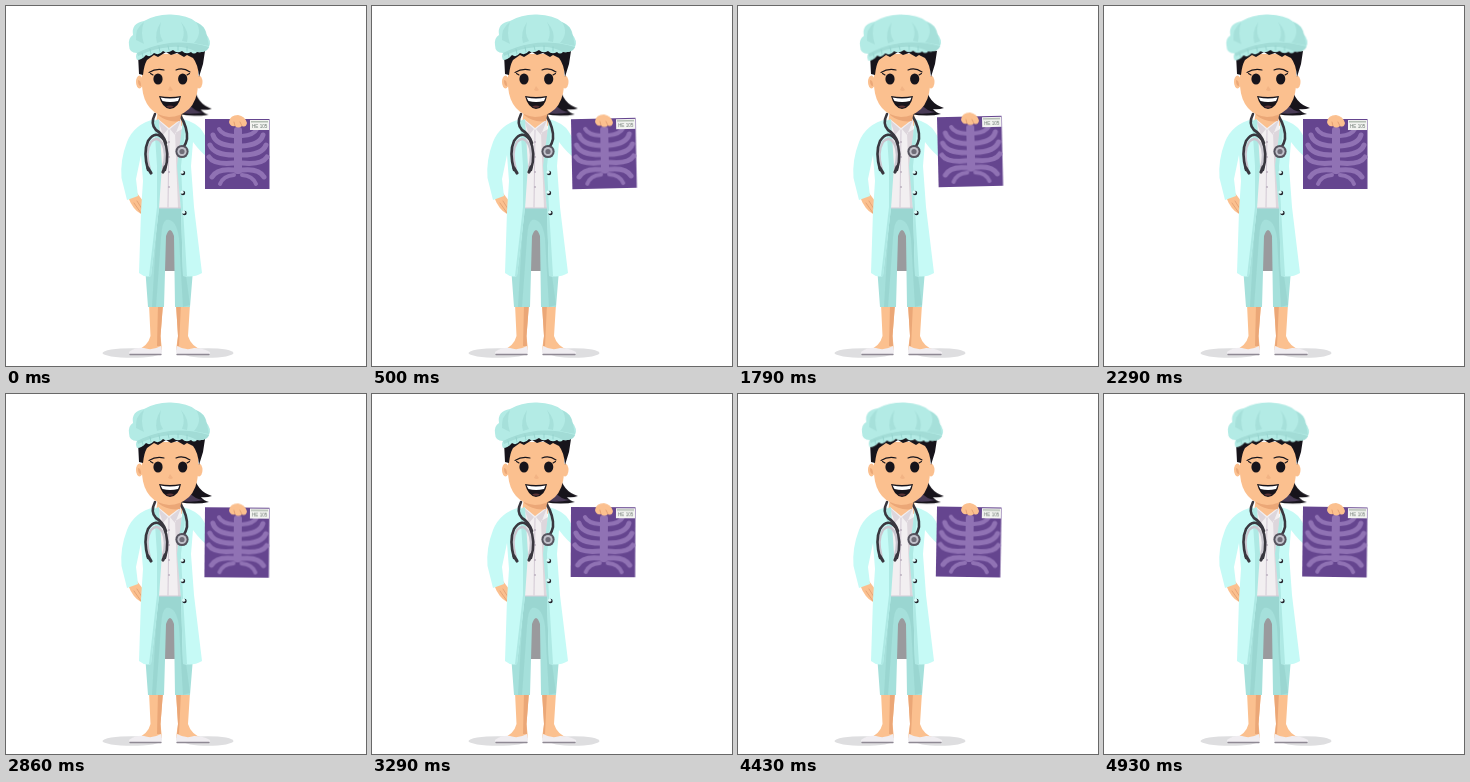
An HTML page for the animation above (5 s loop, 360x360 px).

```html
<!DOCTYPE html>
<html lang="en">
<head>
<meta charset="utf-8">
<title>Nurse with X-ray</title>
<style>
html, body { margin: 0; width: 100%; height: 100%; overflow: hidden; background: #fff; }
svg { display: block; width: 100vw; height: 100vh; }
.skin { fill: #fbc08f; }
.tan { fill: #eba777; }
.coat { fill: #c6faf6; }
.fold { fill: #aee9e4; }
.felt { fill: #b3ebe5; }
.felt-dark { fill: #a2dcd6; }
.hair { fill: #17141b; }
.line { fill: none; stroke-linecap: round; stroke-linejoin: round; }
.sheet { transform-origin: 232px 114px; animation: swing 5s ease-in-out infinite; }
.arm { animation: lift 5s ease-in-out infinite; }
.cap { transform-origin: 165px 80px; animation: sway 5s ease-in-out infinite; }
.tail { transform-origin: 182px 96px; animation: flick 5s ease-in-out infinite; }
@keyframes swing {
  0%, 3% { transform: none; }
  22.8% { transform: rotate(-4.4deg); }
  44% { transform: none; }
  57% { transform: rotate(.5deg); }
  76% { transform: none; }
  88% { transform: rotate(1deg); }
  98.6% { transform: rotate(.7deg); }
  100% { transform: none; }
}
@keyframes lift {
  0%, 3% { transform: none; }
  22.8% { transform: translateY(-2px); }
  35% { transform: translateY(-2.5px); }
  50% { transform: translateY(.5px); }
  76%, 100% { transform: none; }
}
@keyframes sway {
  0%, 14% { transform: none; }
  36% { transform: rotate(-1.3deg); }
  57%, 76% { transform: none; }
  88%, 98.6% { transform: rotate(1.4deg); }
  100% { transform: none; }
}
@keyframes flick {
  0% { transform: rotate(2deg); }
  21%, 57% { transform: none; }
  76%, 98.6% { transform: rotate(.5deg); }
  100% { transform: rotate(2deg); }
}
</style>
</head>
<body>
<svg viewBox="0 0 360 360">
  <defs>
    <g id="ribs" class="line" stroke="#9072b4" stroke-width="5">
      <path d="M213 123Q216 129 228 130" stroke-width="4"/>
      <path d="M207 129Q210 139 228 140"/>
      <path d="M204 139Q208 149 228 149"/>
      <path d="M203 151Q208 159 228 157"/>
      <path d="M206 171Q211 162 228 164"/>
      <path d="M214 178Q217 170 228 169" stroke-width="4"/>
    </g>
    <g id="button">
      <circle r="2.2" fill="#24232c"/>
      <circle cx="-.9" cy="-.8" r="1.6" fill="#dffffc"/>
    </g>
  </defs>

  <g fill="#dedee0">
    <ellipse cx="126" cy="347" rx="29.5" ry="4.8"/>
    <ellipse cx="202" cy="347" rx="25.5" ry="4.8"/>
  </g>

  <!-- legs -->
  <path class="skin" d="M143 298H157L154.5 330L156 344H131Q142 340 144.5 330ZM170 298H184L182 330Q185 340 196 344H170L172 330Z"/>
  <path class="tan" d="M152 298H157L154.5 330L155 340H151ZM170 298H175L173 340H171L172 330Z"/>
  <path fill="#f0edf1" d="M123 346Q130 341 138 342Q146 345 155 340Q157 345 155 349H126Q123 349 123 346ZM171 340Q180 345 188 342Q197 342 204 346Q205 349 200 349H171Q169 345 171 340Z"/>
  <path class="line" stroke="#8f8994" stroke-width="1.3" d="M124 348.5H155M171 348.5H203"/>
  <path fill="#9a9a9d" d="M158 215H172V265H158Z"/>
  <path fill="#a5e0db" d="M150 200H177L187 264L184 301H169L168 230Q164 218 160 230L158 301H142L139 260Z"/>
  <path fill="#8fcdc8" d="M152 203H175L179 262L184 299L177 301L173 232Q170 212 160 214Q156 216 155 232L150 301H146L149 250Z" opacity=".5"/>

  <!-- torso -->
  <path class="skin" d="M152 102H176L177 119L163 127L150 119Z"/>
  <path fill="#f2eff1" d="M152 113L163 122L175 113L178 202H152Z"/>
  <path fill="#ddd6dc" d="M152 114L162 123L157 129ZM175 114L164 123L169 129ZM169 127L178 122V202H172Z"/>
  <path class="line" stroke="#cfc5d1" stroke-width=".9" d="M163 124L162 201M153 202H175"/>
  <g fill="#b8acbb">
    <circle cx="163" cy="136" r=".9"/><circle cx="163" cy="151" r=".9"/>
    <circle cx="163" cy="166" r=".9"/><circle cx="163" cy="181" r=".9"/>
  </g>

  <path class="skin" d="M122 191L131 187L137 195Q139 204 135 208Q127 204 122 191Z"/>
  <path class="line" stroke="#e09d70" stroke-width=".8" d="M128 197L135 207M131 195L136 203"/>
  <path class="coat" d="M149 113Q128 118 121 136Q114 154 115.5 172L121 194L132 190L130 173L135 149L137 175L135 205L133 267Q139 272 145 270L153 202L154 160Z"/>
  <path class="coat" d="M177 113Q192 117 197 126L204 138V153Q195 147 187 136L185 160L188 201L196 267Q188 272 177 270L175 203L172 160Z"/>
  <path class="fold" d="M148 115L153 113L156 160L153 202L145 270L143 270L151 201L151 160ZM177 114L180 116L175 160L177 203L181 270L177 270L175 203L171 160Z"/>
  <use href="#button" x="177" y="167"/>
  <use href="#button" x="177" y="187"/>
  <use href="#button" x="178.5" y="207"/>

  <!-- stethoscope -->
  <g class="line" stroke="#39373f" stroke-width="2.6">
    <path d="M149 108Q144 118 150 124Q157 128 160 137"/>
    <path d="M174 109Q182 122 181 133Q180 138 177 142"/>
    <path stroke="#c9c6cf" stroke-width="2.4" d="M143.5 162Q139 146 145 136Q151 129 156.5 138Q161 147 157 162"/>
    <path d="M142 164Q137 146 142 135Q150 123 158 134Q164 147 159 164"/>
    <path stroke-width="3.2" d="M142 162L145 167M159 161L157 166"/>
  </g>
  <circle cx="176" cy="145.5" r="6.6" fill="#55535e"/>
  <circle cx="176" cy="145.5" r="4.6" fill="#c1c1ca"/>
  <circle cx="176" cy="145.5" r="2.6" fill="#6f6d78"/>

  <!-- head -->
  <g class="tail">
    <path class="hair" d="M188 80Q190 97 206 102Q200 104 195 103Q198 107 203 108Q190 111 172 108Q182 102 188 80Z"/>
    <path fill="#493b56" d="M183 98Q188 105 198 106Q186 109 175 107Z"/>
  </g>
  <path class="tan" d="M152 104Q163 115 176 104L174 115Q162 117 152 109Z"/>
  <g class="skin">
    <ellipse cx="133.5" cy="76" rx="3.5" ry="6.5"/>
    <ellipse cx="193" cy="76" rx="3.5" ry="6.5"/>
    <path d="M136 48H192V80Q191 95 183 103Q174 111 163 111Q151 110 144 102Q137 94 136 80Z"/>
  </g>
  <path class="tan" d="M132 74Q135 74 135 80Q132 80 132 74Z"/>
  <path class="hair" d="M132 48Q164 34 199 45L197 58L193 71Q192 58 187 52L181 49L178 51L171 47L165 49L160 46L152 51L148 49L141 54Q138 59 137 69L133 68Z"/>
  <path class="line" stroke="#17141b" stroke-width="1.1" d="M143 66.5Q150 62 158 64M170 64Q177 61 184 66M147 69L144.5 67.5M181 69L183.5 67.5"/>
  <g class="hair">
    <ellipse cx="152" cy="73" rx="4.6" ry="5.6"/>
    <ellipse cx="176.7" cy="73" rx="4.6" ry="5.6"/>
  </g>
  <path fill="#f2b384" d="M164 80L167 84Q165 86 162 84Z"/>
  <path class="hair" d="M153 90Q164 92 175 90Q173 102 164 103Q156 102 153 90Z"/>
  <path fill="#fff" d="M154.5 91.5Q164 93.5 173.5 91.5L172 95Q164 97 156.5 95Z"/>
  <path fill="#5c3436" d="M160 100.5Q164 98.5 168 100.5Q164 103 160 100.5Z"/>

  <g class="cap">
    <path class="felt" d="M131 54Q129 50 131 47Q123 47 123 39Q122 32 127 29Q125 17 138 15Q150 8 165 8.5Q182 9 190 16Q200 20 200 28Q206 35 203 41Q201 47 191 46Q188 49 185 46Q180 49 176 45Q171 48 167 44Q161 48 157 45Q153 50 148 47Q144 52 140 49Q136 54 131 54Z"/>
    <path class="felt-dark" d="M131 47Q145 40 158 38Q178 34 203 41Q201 47 191 46Q180 40 165 41Q148 42 132 50Z"/>
    <path class="felt-dark" d="M130 34Q129 22 138 16Q134 26 138 38ZM190 16Q200 21 201 30L203 40L188 37Q197 27 190 16ZM151 37Q148 26 155 16Q152 28 157 35ZM176 35Q180 26 175 16Q184 26 181 36Z" opacity=".7"/>
    <path class="line" stroke="#93d2cc" stroke-width=".9" d="M136 47L137 51M144 43L145 48M153 41L154 46M162 40L163 44M172 40L172 44M181 41L181 45"/>
  </g>

  <!-- X-ray -->
  <g class="arm">
    <g class="sheet">
      <rect x="199" y="113" width="64.5" height="70" fill="#65458f"/>
      <use href="#ribs"/>
      <use href="#ribs" transform="matrix(-1 0 0 1 464 0)"/>
      <rect x="228" y="121" width="8" height="47" rx="3" fill="#9072b4"/>
      <rect x="244" y="114" width="19" height="10" fill="#f3f4f1"/>
      <path fill="#b3bdb2" d="M245 115H262V116.5H245Z"/>
      <text x="246" y="122" font-family="Liberation Sans, Arial, sans-serif" font-size="4.6" fill="#66726c">HE 105</text>
    </g>
    <path class="skin" d="M223 116Q224 109 232 109Q239 110 241 117Q240 122 236 120Q232 123 229 120Q224 121 223 116Z"/>
    <path class="line" stroke="#dd996c" stroke-width=".8" d="M229 120L228 116M236 120L234 116"/>
  </g>
</svg>
</body>
</html>
```
